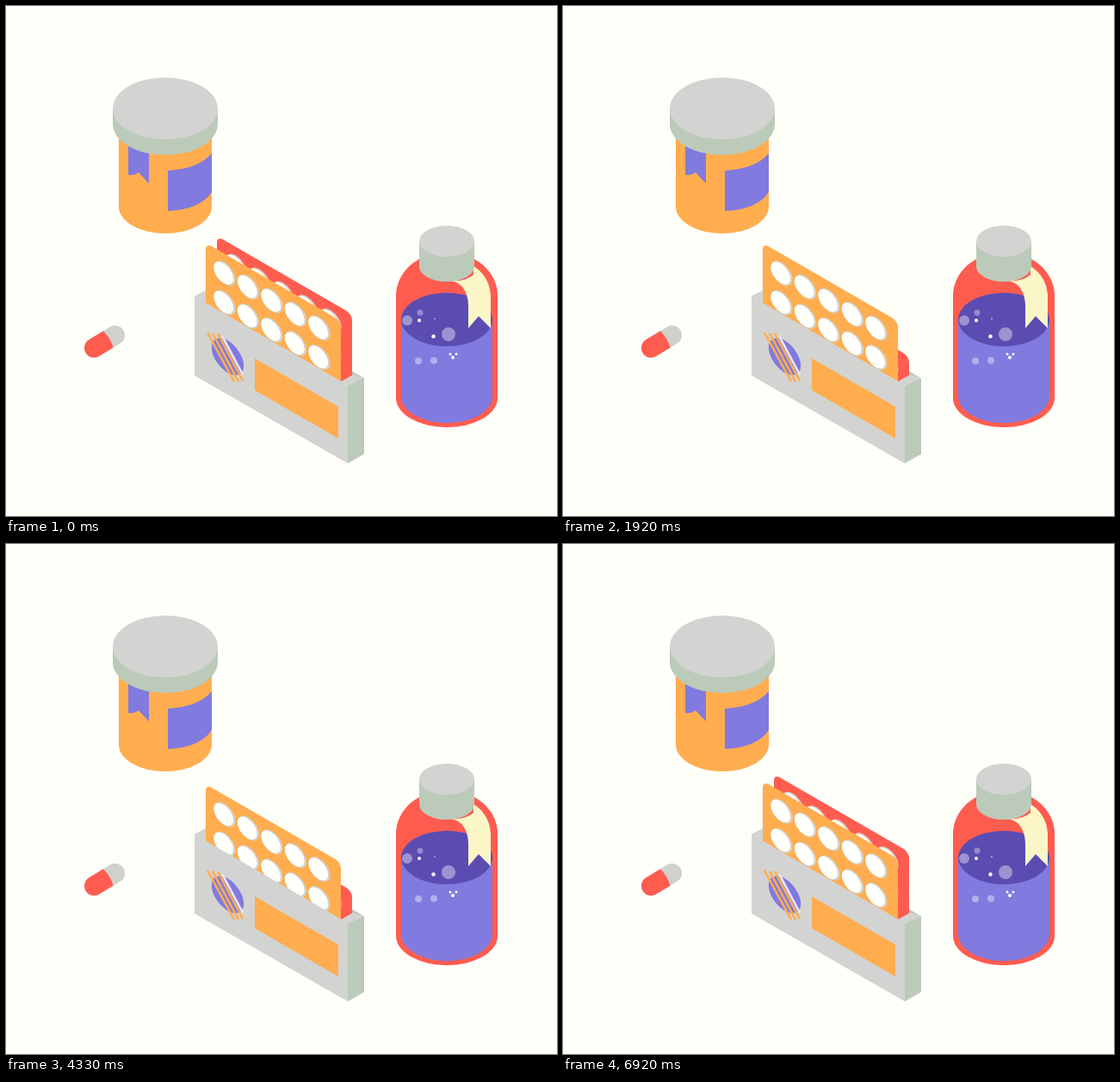
Animation, 640 px wide and 592 px high, one loop 7.08 s. Source, as an HTML page:

```html
<!DOCTYPE html>
<html lang="en">
<head>
<meta charset="utf-8">
<title>Medicine shelf</title>
<style>
html, body { margin: 0; width: 100%; height: 100%; overflow: hidden; background: #fffffa; }
svg { display: block; width: 100vw; height: 100vh; }
.top { fill: #d3d3d2; }
.side { fill: #bccab9; }
.orange { fill: #ffad4f; }
.red { fill: #ff5c50; }
.purple { fill: #817adf; }
.dark { fill: #5b4cb2; }
.cream { fill: #faf6c8; }
</style>
</head>
<body>
<svg viewBox="0 0 640 592">
  <defs>
    <g id="pill">
      <circle r="12.6" fill="#d5d2c6"/>
      <circle cx="-1.3" cy=".6" r="11.4" fill="#fffffc"/>
    </g>
  </defs>

  <g id="jar">
    <path class="orange" d="M131 140V233A54 31 0 0 0 239 233V140Z"/>
    <path class="purple" d="M142 150V196Q149 197 154 193L166 206V150Z"/>
    <path class="purple" d="M188 191Q224 189 239 171V216Q226 236 188 238Z"/>
    <path class="side" d="M124 119V137A61 36 0 0 0 246 137V119Z"/>
    <ellipse class="top" cx="185" cy="119" rx="61" ry="36"/>
  </g>

  <g id="box">
    <path class="side" d="M219 337L237 328L416 432L397 441Z"/>
    <g id="redSheet"></g>
    <g id="orangeSheet"></g>
    <path class="top" d="M219 337L232 330V345L389 436L403 428L416 432L397 442Z"/>
    <path class="side" d="M397 441L416 432V520L397 531Z"/>
    <path class="top" d="M219 337L397 440V531L219 429Z"/>
    <g transform="matrix(1 .577 0 1 257.5 407)">
      <circle class="purple" r="18.7"/>
    </g>
    <g fill="none" stroke="#ffad4f" stroke-width="2.6">
      <path d="M234 379L265 436M240 380L270 436M246 380L275 435"/>
      <path d="M251 383L275 428" stroke="#e9e6f4"/>
    </g>
    <path class="orange" d="M289 409L386 465V502L289 446Z"/>
  </g>

  <g id="bottle">
    <path class="red" d="M453 336C453 318 465 300 484 292H540C559 300 571 318 571 336V455A59 34 0 0 1 453 455Z"/>
    <path class="purple" d="M459 364V453A53 31 0 0 0 565 453V364Z"/>
    <ellipse class="dark" cx="512" cy="364" rx="53" ry="31"/>
    <path class="cream" d="M517 319C530 321 537 333 537 348V374L549 360L563 374V336C562 319 553 308 543 302V312Q534 320 517 319Z"/>
    <g id="bubbles" fill="#fff"></g>
    <path class="side" d="M480 273V302A32 18 0 0 0 544 302V273Z"/>
    <ellipse class="top" cx="512" cy="273" rx="32" ry="18"/>
  </g>

  <g id="capsule">
    <rect x="-25.5" y="-11.3" width="51" height="22.6" rx="11.3" fill="#cfd1ca"/>
    <path class="red" d="M5 -11.3H-14.2A11.3 11.3 0 0 0 -14.2 11.3H5Q8 0 5 -11.3Z"/>
  </g>
</svg>

<script>
const LOOP = 7080, STEP = 83.3, SLOPE = 0.577, SHEET_TRAVEL = 49;
const el = id => document.getElementById(id);
const clamp = u => Math.min(1, Math.max(0, u));
const span = (t, a, b) => clamp((t - a) / (b - a));
const smooth = u => 0.5 - 0.5 * Math.cos(Math.PI * u);
const bump = (t, a, b) => Math.sin(Math.PI * span(t, a, b));

// x, y, radius, opacity
const bubbles = [
  [466, 365, 6, .4], [481, 356, 3.5, .35], [514, 381, 8, .4],
  [480, 365, 2, 1], [496.5, 383.5, 2.2, 1], [498, 363, 1, .5],
  [479, 412, 4, .4], [497, 411.5, 4, .4],
  [516, 404, 1.5, 1], [523, 404, 1.5, 1], [519, 408, 2, 1]
];
el("bubbles").innerHTML = bubbles.map(([x, y, r, o]) =>
  `<circle cx="${x}" cy="${y}" r="${r}" opacity="${o}"/>`).join("");

function fillSheet(id, color, usedPill) {
  let parts = `<rect class="${color}" width="157" height="100" rx="7"/>`;
  for (let row = 0; row < 2; row++) {
    for (let col = 0; col < 5; col++) {
      const x = 22 + 27.5 * col, y = 22.5 + 34 * row;
      parts += usedPill && row === 1 && col === 4
        ? `<circle cx="${x}" cy="${y}" r="12.4" fill="#c9c8a9"/>`
        : `<use href="#pill" x="${x}" y="${y}"/>`;
    }
  }
  el(id).innerHTML = parts;
}
fillSheet("redSheet", "red", true);
fillSheet("orangeSheet", "orange", false);

// Each jump: take-off, peak, landing, height
const jarJumps = [[200, 611, 1090, 60], [2170, 2620, 3280, 60], [4716, 5099, 5490, 60], [6200, 6380, 6600, 19]];
const bottleJumps = [[650, 1090, 1580, 56], [2742, 3190, 3706, 56], [5140, 5520, 6010, 56]];
const capsuleJumps = [[330, 850, 1460, 58], [2680, 3470, 4061, 58], [5080, 5600, 6170, 58]];

function lift(t, [start, peak, land, height]) {
  if (t <= start || t >= land) return 0;
  return t < peak
    ? height * (1 - (1 - span(t, start, peak)) ** 2)
    : height * (1 - span(t, peak, land) ** 2);
}
const totalLift = (t, jumps) => jumps.reduce((sum, jump) => sum + lift(t, jump), 0);

function hop(id, t, jumps, x, floor, narrow) {
  let sx = 1, sy = 1;
  for (const [start, , land] of jumps) {
    const crouch = bump(t, start - 140, start), impact = bump(t, land, land + 190);
    const air = span(t, start - 30, start + 60) * (1 - span(t, land - 60, land + 50));
    sx += 0.08 * crouch - narrow * air + 0.03 * bump(t, land + 60, land + 190);
    sy -= 0.07 * crouch + 0.052 * impact;
  }
  const y = floor - totalLift(t, jumps);
  el(id).setAttribute("transform",
    `translate(${x} ${y}) scale(${sx} ${sy}) translate(${-x} ${-floor})`);
}

// Eased switching between raised (0) and lowered (1)
const toggle = (t, moves) => moves.reduce((sum, [a, b], i) =>
  sum + (i % 2 ? -1 : 1) * smooth(span(t, a, b)), 0);
const swaps = [[1200, 1650], [1900, 2400], [3100, 3800], [4250, 4700], [5200, 5850]];
const redMoves = [...swaps, [6300, 6900]];
const orangeMoves = [[200, 800], ...swaps];

function placeSheet(id, x, y, lowered) {
  el(id).setAttribute("transform", `matrix(1 ${SLOPE} 0 1 ${x} ${y + SHEET_TRAVEL * lowered})`);
}

function draw(time) {
  const t = Math.floor((time + 4) / STEP) * STEP;
  hop("jar", t, jarJumps, 185, 264, 0.05);
  hop("bottle", t, bottleJumps, 512, 489, 0.06);
  const up = totalLift(t, capsuleJumps);
  el("capsule").setAttribute("transform",
    `translate(114.5 ${389.5 - up}) rotate(${-31 + up * 0.16})`);
  placeSheet("redSheet", 245, 267, toggle(t, redMoves));
  placeSheet("orangeSheet", 232, 275, toggle(t, orangeMoves));
}

const begin = performance.now();
function tick() {
  draw((performance.now() - begin) % LOOP);
  requestAnimationFrame(tick);
}
tick();
</script>
</body>
</html>
```
